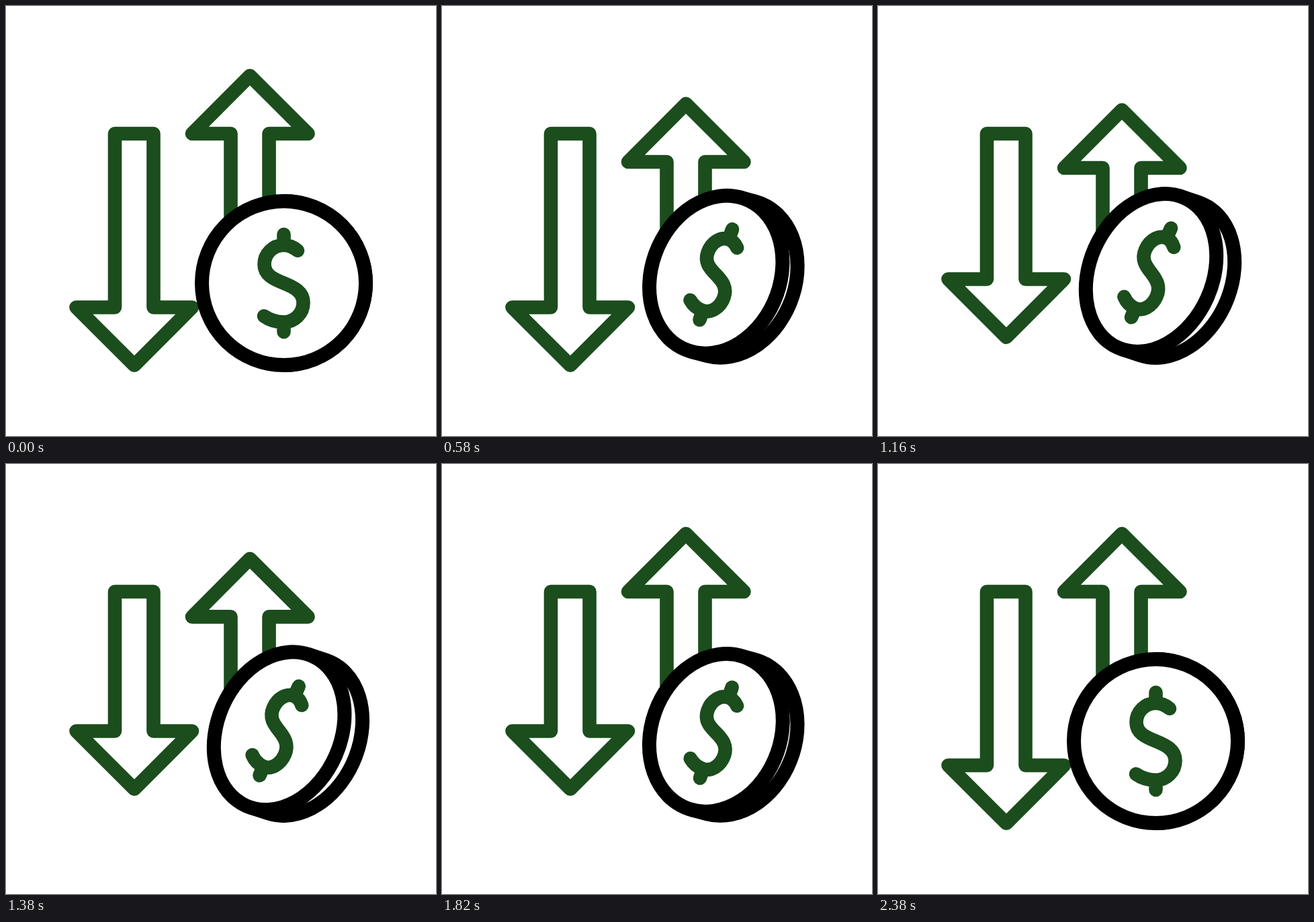
An HTML page for the animation above (2.4 s loop, 640 by 640 pixels).

```html
<!DOCTYPE html>
<html lang="en">
<head>
<meta charset="utf-8">
<title>Coin and arrows</title>
<style>
  html, body { margin: 0; height: 100%; overflow: hidden; background: #fff; }
  svg { display: block; width: 100vw; height: 100vh; }
  path, circle { stroke-linejoin: round; stroke-linecap: round; vector-effect: non-scaling-stroke; }
  .green { fill: none; stroke: #1b4d1d; stroke-width: 20.6; }
  .black { fill: #fff; stroke: #000; stroke-width: 21; }
</style>
</head>
<body>
<svg viewBox="0 0 640 640">
  <path id="down" class="green"/>
  <path id="up" class="green"/>
  <g id="coin">
    <path id="back" class="black"/>
    <circle class="black" r="122"/>
    <path class="green" d="M20.5-48.5C14-54 7-56.5 0-56.5C-16-56.5-29-44-29-28
      C-29-12-15-6 0 0C15 6 29 13 29 29C29 45 16 58 0 58C-11 58-21 55-29.5 49
      M0-72.5V-57M0 58V72.5"/>
  </g>
</svg>
<script>
const LOOP = 2400, RADIUS = 122, TRAVEL = 51, MOVE = 425;
const TILTED = new DOMMatrix().rotate(24).scale(.75, 1);
const $ = id => document.getElementById(id);
const set = (id, attrs) => {
  for (const name in attrs) $(id).setAttribute(name, attrs[name]);
};
const clamp = x => Math.min(1, Math.max(0, x));
const smooth = x => x * x * (3 - 2 * x);
const mix = (from, to, x) => from + (to - from) * x;

// Head offset: out at one time, back at another
const slide = (t, out, back) =>
  TRAVEL * (smooth(clamp((t - out) / MOVE)) - smooth(clamp((t - back) / MOVE)));

// cubic-bezier(.22, 0, .14, 1), solved by bisection
function ease(x) {
  let low = 0, high = 1;
  for (let i = 0; i < 24; i++) {
    const s = (low + high) / 2, r = 1 - s;
    if (3 * r * r * s * .22 + 3 * r * s * s * .14 + s * s * s < x) low = s;
    else high = s;
  }
  return smooth(low);
}

function drawCoin(tilt) {
  // Points travel straight from the flat to the tilted coin
  const shape = new DOMMatrix([
    mix(1, TILTED.a, tilt), mix(0, TILTED.b, tilt),
    mix(0, TILTED.c, tilt), mix(1, TILTED.d, tilt), 0, 0
  ]);
  const place = new DOMMatrix().translate(413.5 - 7 * tilt, 412.5 - 15.5 * tilt);
  set('coin', { transform: place.multiply(shape) });

  // The rim runs from the face to the back, shifted in screen space
  const rim = shape.inverse().transformPoint({ x: 27 * tilt, y: 9 * tilt * tilt });
  const depth = Math.hypot(rim.x, rim.y);
  set('back', {
    transform: `rotate(${Math.atan2(rim.y, rim.x) * 180 / Math.PI})`,
    d: `M0 ${-RADIUS}H${depth}A${RADIUS} ${RADIUS} 0 0 1 ${depth} ${RADIUS}H0Z`
  });
}

function draw(t) {
  const downY = 448.5 - slide(t, 850, 1867);
  const upY = 190 + slide(t, 270, 1237);
  set('down', { d: `M162 190H219.5V${downY}H277L191 ${downY + 86.3}L104.5 ${downY}H162Z` });
  set('up', { d: `M334.5 336V${upY}H277L363 ${upY - 86.3}L449.5 ${upY}H391.5V336` });
  drawCoin(ease(clamp(1 - Math.abs(t / 1190 - 1))));
}

function tick() {
  draw(performance.now() % LOOP);
  requestAnimationFrame(tick);
}
tick();
</script>
</body>
</html>
```
